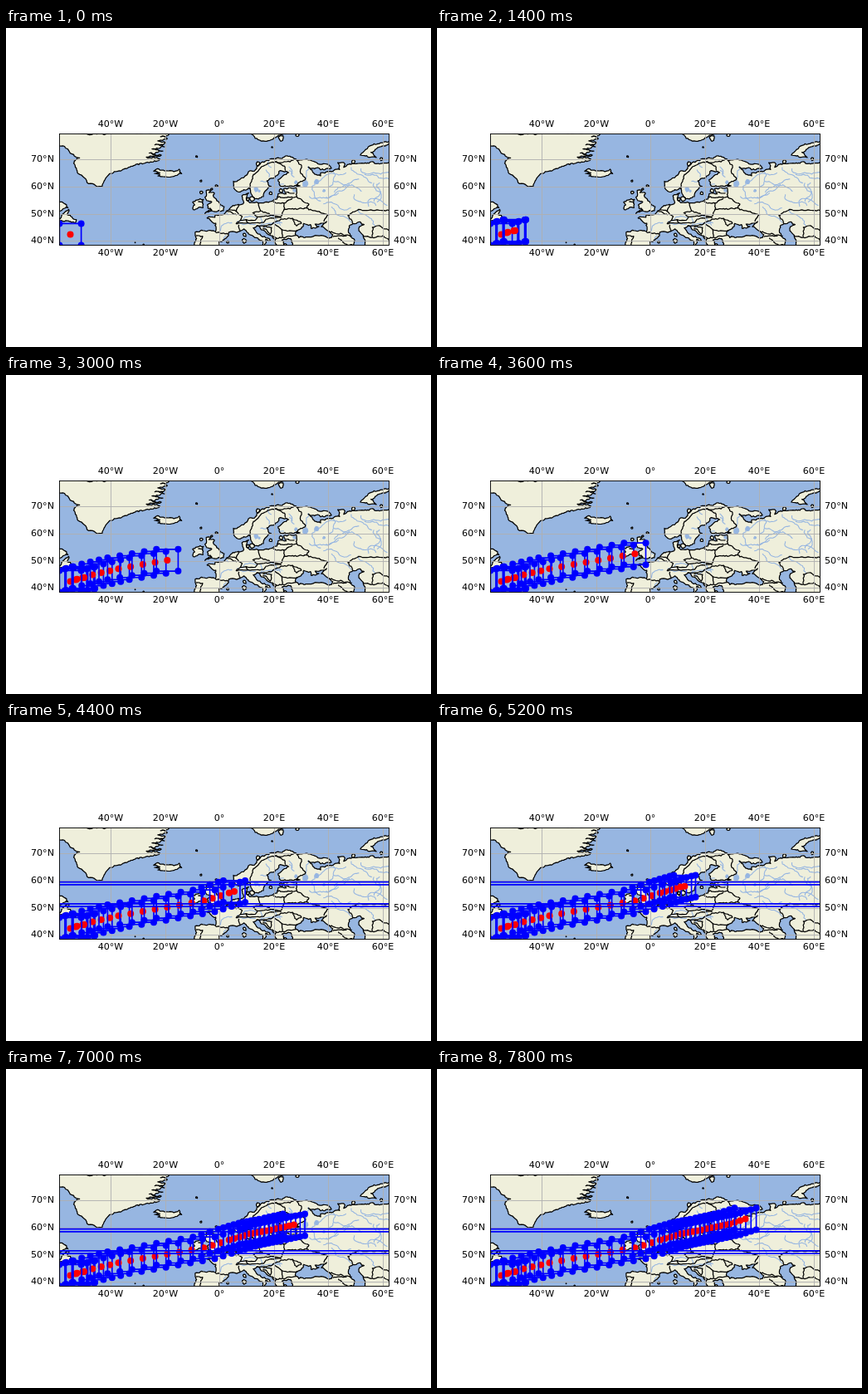
These frames come from a looping animation (512 by 384 pixels, 8000 ms). An HTML page:

```html
<!DOCTYPE html>
<html lang="en">
<head>
<meta charset="utf-8">
<title>Track across the North Atlantic</title>
<style>
html, body { margin: 0; width: 100%; height: 100%; overflow: hidden; background: #fff; }
svg { display: block; width: 100vw; height: 100vh; }
text { font: 11.11px "DejaVu Sans", sans-serif; }
.land { fill: #efefdb; }
.sea { fill: #97b6e1; }
.river { fill: none; stroke: #97b6e1; stroke-width: 1.1; }
.outline { fill: none; stroke: #000; stroke-width: 1.25; stroke-linejoin: round; }
.grid { stroke: #b0b0b0; stroke-width: .9; }
.box { fill: none; stroke: #00f; stroke-width: 1.7; }
.corner { fill: #00f; }
.center { fill: #f00; }
</style>
</head>
<body>
<svg viewBox="0 0 512 384">
  <clipPath id="frame"><rect x="64.5" y="127.5" width="397" height="134"/></clipPath>
  <g clip-path="url(#frame)">
    <rect class="sea" x="64" y="127" width="398" height="135"/>
    <g id="ground"></g>
    <g id="outlines"></g>
    <g id="grid"></g>
    <g id="track"></g>
  </g>
  <rect x="64.5" y="127.5" width="397" height="134" fill="none" stroke="#000" stroke-width=".9"/>
  <g id="labels"></g>
</svg>
<script>
const px = lon => 257.6 + 3.28 * lon;
const py = lat => 387.5 - 3.28 * lat;

function add(layer, tag, attrs, text) {
  const parent = typeof layer === "string" ? document.getElementById(layer) : layer;
  const el = document.createElementNS("http://www.w3.org/2000/svg", tag);
  for (const key in attrs) el.setAttribute(key, attrs[key]);
  if (text) el.textContent = text;
  parent.append(el);
  return el;
}

let seed = 7;
const random = () => (seed = seed * 16807 % 2147483647) / 2147483647;
const noise = () => random() * 2 - 1;

const parse = s => s.trim().split(/\s+/).map(p => p.split(",").map(Number));
const project = ([lon, lat]) => [px(lon), py(lat)];

// Midpoint displacement turns a few key points into a ragged line.
function ragged([x0, y0], [x1, y1], amp) {
  const dx = x1 - x0, dy = y1 - y0, length = Math.hypot(dx, dy);
  if (length < 2.6) return [[x1, y1]];
  const shift = noise() * Math.min(amp, length * .22) / length;
  const mid = [(x0 + x1) / 2 - dy * shift, (y0 + y1) / 2 + dx * shift];
  return [...ragged([x0, y0], mid, amp), ...ragged(mid, [x1, y1], amp)];
}

function path(coords, amp, closed) {
  const pts = coords.map(project);
  if (closed) pts.push(pts[0]);
  const line = pts.slice(1).flatMap((p, i) => ragged(pts[i], p, amp));
  return "M" + [pts[0], ...line].map(p => p.map(v => v.toFixed(1))).join("L") + (closed ? "Z" : "");
}

function area(cls, coords, amp = 1.3) {
  const d = path(coords, amp, true);
  add("ground", "path", { class: cls, d });
  add("outlines", "path", { class: "outline", d });
}

function blob(lon, lat, radius) {
  const points = Array.from({ length: 7 }, (_, i) => {
    const r = radius * (.8 + random() * .5), a = i * Math.PI * 2 / 7;
    return [lon + r * Math.cos(a), lat + r * Math.sin(a)];
  });
  return points;
}

// Greenland: the east side is a comb of fjords.
const fjords = Array.from({ length: 13 }, (_, i) =>
  [-22 + i * .27 - (i % 2) * (5.5 - i * .25), 70 + i * .75]);
area("land", [...parse(`-62,80 -62,76.2 -57,74.7 -54.5,72 -51.5,70.5 -53.7,68.5 -52,64.7 -48.2,61 -45.5,60.2 -43.2,60.1
  -40.5,64.7 -33.5,67 -26,68.7`), ...fjords, [-19, 80]], 1.6);

const europe = `63,69.2 60,68.6 53,68.5 46.6,67.6 45.5,67 46,68.2 43.3,68.7 44,66.2 40,65.4 37,65 37,63.9 34.8,64.5 32.5,67.1
  38.5,66.1 41,66.7 40,68 30,69.7 25.7,71.1 18,69.5 14.5,68.3 13,66 8,63.1 5,61.9 5.4,59 7,58 10.6,59.4 12.8,55.5 14.2,55.4
  16,56.3 17,58.6 18.8,60 17.3,62 21.5,64.5 22.3,65.8 25.3,65.1 21.4,62.5 22,60.4 29.5,60.2 28,59.6 23.5,59.2 24.4,57.3
  21.4,57.3 21,55.4 19,54.5 14.2,53.9 11,54 9.8,55 10.6,57.6 8.1,56.6 8.8,54 4.8,53 3.3,51.4 .2,49.6 -1.6,49.6 -1.8,48.7
  -4.7,48.4 -1.5,46.5 -1.6,43.4 -9,43.3 -8.8,40 -9.4,38.7 -9,37`;
const mediterranean = `0,37 -.3,39.5 3.2,41.9 3.3,43.2 6.2,43.1 8.9,44.4 10.4,43 15.7,40 16,37 17,39.3 16.8,40.5 18.5,40.1
  14,42.6 12.3,44.8 13.6,45.6 15.2,44.1 19.4,41.9 20.5,39 21,37 24,37 22.8,40.3 26,40.8 26.7,38.4 27,37 63,37`;
area("land", parse(europe + " " + mediterranean));

const lands = {
  britain: `-5.5,50.1 1.3,51.1 1.6,52.6 0,53.6 -2.2,56 -2,57.6 -4,57.7 -3.2,58.6 -5,58.5 -5.5,56 -4.8,54.8 -3,54.3 -4.6,53.2
    -4.4,52 -3,51.4`,
  ireland: "-6.2,52.2 -9.8,51.5 -9.2,53.2 -10,54.2 -8.4,55 -6,55.2 -6.1,53.5",
  iceland: "-22.7,63.8 -18.8,63.4 -14,64.7 -14.9,66.3 -20.3,65.7 -22.4,66.4 -24.3,65.6 -22,65 -24,64.8 -22,64.4",
  novayaZemlya: "51.6,71.5 57.5,70.6 55.5,72.5 57,73.5 63,75.6 63,76.3 55.8,75.1",
  labrador: "-60,55 -57.3,53.8 -55.8,52.2 -60,50.2",
  newfoundland: "-55.5,51.6 -59.3,47.8 -53,46.7 -52.7,47.8 -56,49.6",
  svalbard: "10.5,79.6 14,77.2 16.6,76.6 21,78.3 26,79.5 23,80"
};
for (const name in lands) area("land", parse(lands[name]));

const seas = {
  black: "29,41.2 27.7,42.5 28.8,44 30.8,46.4 33.3,46 33.5,44.6 36.4,45.3 35,46.2 39.2,47.1 37.3,45.2 41.5,42.3 41,41.2 35,42",
  caspian: "49,38 49.5,40.3 47.2,43.5 47.5,45.5 51.5,47 53,46 51,44.5 52.7,42 53.7,38"
};
for (const name in seas) area("sea", parse(seas[name]));

// Small islands and lakes: longitude, latitude, radius in degrees.
parse(`11.8,55.4,.8 10.3,55.3,.5 9.1,42.2,.6 9,40,.8 18.7,57.5,.5 22.5,58.4,.6 2.9,39.6,.4 -6.9,62,.3 -1.2,60.2,.4 -6.8,57.8,.5
  -3,59,.3 -8.5,71,.3 -31.1,39.4,.1 -28,38.6,.2 14,68.2,.7 49,69,.6 59.3,70,.5 22.5,77.7,.9 19.2,74.4,.2 28.5,78.9,.6 24,38.6,.5`)
  .forEach(island => area("land", blob(...island), .4));
parse("13.3,58.9,.7 14.5,58.3,.3 31.5,60.9,.9 35.5,61.7,.7 27.5,58.5,.5 38.3,58.4,.4 28,61.5,.5")
  .forEach(lake => add("ground", "path", { class: "river", style: "fill:#97b6e1", d: path(blob(...lake), .4, true) }));

// Rivers wander from seeded springs: count, western edge, southern edge, width, height, length.
function rivers(count, west, south, width, height, length) {
  for (let i = 0; i < count; i++) {
    let lon = west + random() * width, lat = south + random() * height, angle = random() * 6.28;
    const course = [[lon, lat]];
    for (let j = 0; j < length; j++) {
      angle += noise() * .9;
      course.push([lon += 1.6 * Math.cos(angle), lat += Math.sin(angle)]);
    }
    add("ground", "path", { class: "river", d: path(course, .6, false) });
  }
}
rivers(18, 28, 49, 34, 18, 8);
rivers(9, -5, 42, 30, 10, 5);
rivers(6, 14, 61, 12, 7, 3);

const borders = `11.2,59.1 12,63.5 16,67.5 20.5,69.1 23.7,67.5 24.1,65.8/20.5,69.1 25.8,69 28,70 30,67.7 29.7,64.8 31.5,62.9 28,60.5
  /28,59.5 28.2,56.2 32.7,53.5 31.8,52.1 40,49.6 38.2,47.1/24.3,57.9 27.4,57.5/21,56.1 28.2,56.2/26.6,55.7 23.5,53.9/23.6,51.5 31.8,52.1
  /19.5,54.4 23.5,53.9 23.6,51.5 22.6,49.1 18.8,49.5 15,51 14.2,53.9/15,51 12.1,50.3 13.8,48.8 18.8,49.5/17,48 22.6,48.4
  /13.8,48.8 13,47.6 7.6,47.6 6,46.3 10.4,46.6 9.6,47.5/7.6,47.6 8.2,49 6.1,50.8 7,53.3/6.2,49.5 2.5,51.1/3.4,51.4 6.1,50.8
  /7.5,43.8 7,45.9/10.4,46.6 16.1,46.8 17,48/-8.8,41.9 -6.3,41.7 -7.3,38/-1.7,43.3 3.1,42.4/-8,54.4 -6.2,54.1
  /13.6,45.5 18.8,45.9 22.9,48 26.6,48.3 28.2,45.5/15.8,45.2 19,44.9 18.5,42.5 15.8,44.7/20.2,46.1 22.7,44.2 23,41.3 28,42
  /26.6,48.3 30,46.5 28.2,45.5/22.7,44.2 28.6,43.7/19.4,41.8 21,40.9 20,39.7/21,40.9 23,41.3`;
const easternBorders = `49,46.3 47,49.3 51,51.6 63,51.2/40,43.4 48.5,41.8/41.5,41.5 46.6,41.8/43.5,41.1 46.5,38.8 48.9,38.4
  /52.5,41.8 56,41.3 56,45 58.6,45.6 63,43.5/56,41.3 60,42 63,39.4`;
(borders + "/" + easternBorders).split("/").forEach(s =>
  add("outlines", "path", { class: "outline", d: path(parse(s), .9, false) }));

const label = (x, y, anchor, text) => add("labels", "text", { x, y, "text-anchor": anchor }, text);

for (let lon = -40; lon <= 60; lon += 20) {
  const x = Math.floor(px(lon)) + .5, name = Math.abs(lon) + "°" + (lon < 0 ? "W" : lon > 0 ? "E" : "");
  add("grid", "line", { class: "grid", x1: x, x2: x, y1: 127, y2: 262 });
  label(x - .5, 119, "middle", name);
  label(x - .5, 274, "middle", name);
}
for (let lat = 40; lat <= 70; lat += 10) {
  const y = Math.round(py(lat)) + .5;
  add("grid", "line", { class: "grid", x1: 64, x2: 462, y1: y, y2: y });
  label(58, y + 2.5, "end", lat + "°N");
  label(467, y + 2.5, "start", lat + "°N");
}

const HALF = 13.1, STEP = 200, COUNT = 40;

// Step, x and y of the storm centre where its speed or heading changes.
const turns = parse(`0,77.5,248.5 1,84,246.5 2,85.5,245.8 3,92.5,244.2 7,94,243.8 8,104.3,240.5 11,135.5,233.2 18,238.4,215.3
  21,268.8,205.8 25,293.5,198.6 30,318,193.8 31,324.5,192.3 36,352.5,186.4 39,371.5,180.4`);

function centerAt(step) {
  const i = Math.max(1, turns.findIndex(t => t[0] >= step));
  const [s0, x0, y0] = turns[i - 1], [s1, x1, y1] = turns[i];
  const u = (step - s0) / (s1 - s0);
  return [x0 + (x1 - x0) * u, y0 + (y1 - y0) * u];
}

const steps = Array.from({ length: COUNT }, (_, i) => {
  const [x, y] = centerAt(i);
  const g = add("track", "g", {});
  const l = x - HALF, r = x + HALF, t = y - HALF, b = y + HALF;
  // A box whose west side is still behind the zero meridian runs around the globe.
  const [from, to] = l < px(0) && x > px(0) ? [60, 466] : [l, r];
  add(g, "path", { class: "box", d: `M${from} ${t}H${to}M${from} ${b}H${to}M${l} ${t}V${b}M${r} ${t}V${b}` });
  for (const cx of [l, r]) for (const cy of [t, b]) add(g, "circle", { class: "corner", cx, cy, r: 4 });
  add(g, "circle", { class: "center", cx: x, cy: y, r: 4 });
  return g;
});

const start = performance.now();
function draw() {
  const now = Math.floor(Math.max(0, performance.now() - start) / STEP) % COUNT;
  steps.forEach((g, i) => g.setAttribute("visibility", i <= now ? "visible" : "hidden"));
  requestAnimationFrame(draw);
}
draw();
</script>
</body>
</html>
```
